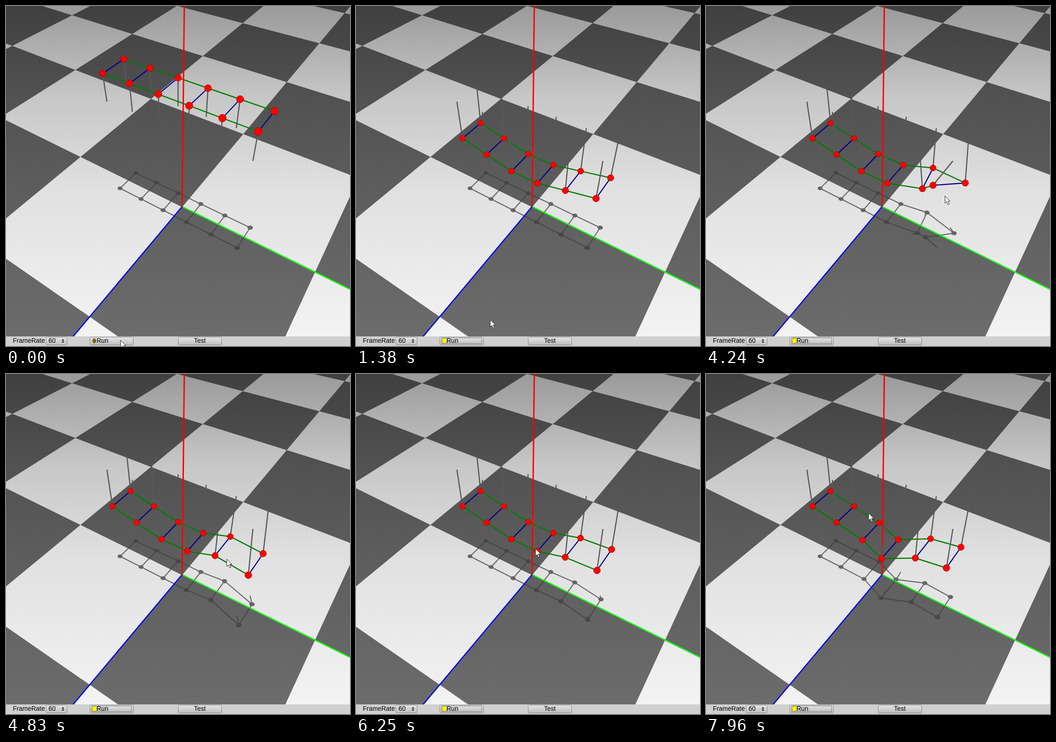
Recreate the animation shown at these times as an HTML page with a canvas. Size 752 px wide and 744 px high, loop 8 s.

```html
<!DOCTYPE html>
<html lang="en">
<head>
<meta charset="utf-8">
<title>Hanging lattice</title>
<style>
  html, body { margin: 0; overflow: hidden; }
  canvas { display: block; }
</style>
</head>
<body>
<canvas id="stage" width="752" height="744"></canvas>
<script>
const W = 752, H = 744, LOOP = 8000, START = 510, ANCHOR = 0.8, COLS = 6;
const stage = document.getElementById('stage').getContext('2d');
const layer = () => Object.assign(document.createElement('canvas'), { width: W, height: H }).getContext('2d');
const floor = layer(), shade = layer();

// Perspective camera: x and z lie on the floor (one tile = 1), h is height.
function project([x, z, h = 0]) {
  const w = 1 - 0.1328 * x - 0.2022 * z - 0.2415 * h;
  return [(385 + 200.5 * x - 238.5 * z - 90.9 * h) / w,
          (440 + 65.8 * x + 103 * z - 298.7 * h) / w, 1 / w];
}

function line(c, a, b, color, width) {
  const p = project(a), q = project(b);
  c.strokeStyle = color;
  c.lineWidth = width;
  c.beginPath();
  c.moveTo(p[0], p[1]);
  c.lineTo(q[0], q[1]);
  c.stroke();
}

function smooth(u) {
  const v = Math.min(1, Math.max(0, u));
  return v * v * (3 - 2 * v);
}

// Each push knocks single balls for a moment, then leaves a pair of balls
// and its inner neighbours displaced, sinking back slowly.
const pushes = [
  { at: 4240, column: 5, decay: 1700, pair: [.06, .085], neighbour: [-.018, -.027],
    knock: { front5: [-.105, -.034], back5: [.043, .029], front4: [.03, -.034], back4: [0, -.033] } },
  { at: 6400, column: 3, decay: 4500, pair: [.01, .113], neighbour: [.014, .004], knock: {} }
];

function swing(row, column, t) {
  const offset = [0, 0];
  for (const p of pushes) {
    const s = t - p.at;
    const bell = Math.exp(-((s / 170) ** 2));
    const drift = smooth(s / 220) * Math.exp(-s / p.decay);
    const rest = column === p.column ? p.pair : column === p.column - 1 ? p.neighbour : [0, 0];
    const hit = p.knock[row + column] || [0, 0];
    for (const n of [0, 1]) offset[n] += bell * hit[n] + drift * rest[n];
  }
  return offset;
}

// Balls hang on inextensible ropes; before that they fall freely.
function makeRow(name, z, t) {
  const seconds = Math.max(0, t - START) / 1000;
  const falling = 1 - 1.65 * seconds ** 2;
  return Array.from({ length: COLS }, (_, i) => {
    const x = -0.5 + 0.2 * i, rope = 0.3 + 0.05 * Math.min(i, COLS - 1 - i, 2);
    const [dx, dz] = swing(name, i, t);
    const hang = ANCHOR - Math.sqrt(rope * rope - dx * dx - dz * dz);
    return { anchor: [x, z, ANCHOR], pos: [x + dx, z + dz, Math.max(hang, falling)] };
  });
}

const ground = p => [p[0], p[1], 0];
const chain = (c, row, color, width, map = p => p) =>
  row.slice(1).forEach((b, i) => line(c, map(row[i].pos), map(b.pos), color, width));
const ropes = row => row.forEach(b => line(stage, b.anchor, b.pos, '#585858', 2.5));

function balls(row) {
  for (const { pos } of row) {
    const [x, y, s] = project(pos);
    stage.beginPath();
    stage.arc(x, y, 5.8 * s, 0, 7);
    stage.fillStyle = '#f00';
    stage.fill();
    stage.strokeStyle = '#b00000';
    stage.lineWidth = 1;
    stage.stroke();
  }
}

function shadows(back, front) {
  const color = '#404040';
  shade.clearRect(0, 0, W, H);
  shade.fillStyle = color;
  for (const row of [back, front]) {
    chain(shade, row, color, 2.2, ground);
    for (const { anchor, pos } of row) {
      const [x, y, s] = project(ground(pos));
      line(shade, ground(anchor), ground(pos), color, 2.2);
      shade.beginPath();
      shade.ellipse(x, y, 5.6 * s, 4.2 * s, 0.1, 0, 7);
      shade.fill();
    }
  }
  back.forEach((b, i) => line(shade, ground(b.pos), ground(front[i].pos), color, 2.2));
  stage.globalAlpha = 0.77;
  stage.drawImage(shade.canvas, 0, 0);
  stage.globalAlpha = 1;
}

function gradient(c, y0, y1, ...stops) {
  const g = c.createLinearGradient(0, y0, 0, y1);
  stops.forEach(([at, level]) => g.addColorStop(at, `rgb(${level},${level},${level})`));
  return g;
}

function paintFloor() {
  floor.fillStyle = gradient(floor, 0, 722, [0, 154], [.27, 198], [.55, 224], [1, 243]);
  floor.fillRect(0, 0, W, H);
  floor.fillStyle = gradient(floor, 0, 722, [0, 64], [.27, 81], [.55, 93], [1, 108]);
  for (let i = -6; i <= 2; i++) for (let j = -7; j <= 1; j++) {
    if ((i + j) % 2) continue;
    floor.beginPath();
    [[i, j], [i + 1, j], [i + 1, j + 1], [i, j + 1]].forEach(p => floor.lineTo(...project(p).slice(0, 2)));
    floor.fill();
  }
}

function button(x, w) {
  stage.fillStyle = gradient(stage, 724, 742, [0, 230], [1, 188]);
  stage.strokeStyle = '#858585';
  stage.lineWidth = 1;
  stage.beginPath();
  stage.roundRect(x + .5, 724.5, w, 17, 2);
  stage.fill();
  stage.stroke();
}

function toolbar(running) {
  stage.fillStyle = '#d0d0d0';
  stage.fillRect(0, 723, W, 21);
  button(87, 46);
  button(183, 95);
  button(376, 95);
  stage.fillStyle = running ? '#ff0' : '#806400';
  stage.strokeStyle = running ? '#b8b000' : '#6a5200';
  stage.beginPath();
  if (running) stage.roundRect(188.5, 727.5, 9, 10, 2);
  else stage.ellipse(193, 732.5, 3.5, 5, 0, 0, 7);
  stage.fill();
  stage.stroke();
  if (running) {
    stage.strokeStyle = '#333';
    stage.setLineDash([1, 1]);
    stage.strokeRect(187.5, 726.5, 87, 12);
    stage.setLineDash([]);
  }
  stage.fillStyle = '#000';
  stage.font = '14px "Liberation Sans", Arial, sans-serif';
  stage.fillText('FrameRate', 15, 737);
  stage.fillText('60', 93, 737);
  stage.fillText('Run', 198, 737);
  stage.fillText('Test', 411, 737);
  for (const d of [-1, 1]) {
    stage.beginPath();
    stage.moveTo(121.5, 733 + d);
    stage.lineTo(127.5, 733 + d);
    stage.lineTo(124.5, 733 + 4 * d);
    stage.fill();
  }
}

// The pointer glides from stop to stop: departure, arrival, place.
const start = [250, 731];
const glides = [
  [1000, 1380, 293, 686], [1380, 2200, 497, 391], [2200, 2610, 522, 415],
  [4500, 5400, 392, 381], [6200, 6700, 386, 406], [7020, 7760, 355, 304]
];

function pointerAt(t) {
  let [x, y] = start;
  for (const [from, to, nx, ny] of glides) {
    const u = smooth((t - from) / (to - from));
    x += (nx - x) * u;
    y += (ny - y) * u;
  }
  return [x, y];
}

function cursor([x, y]) {
  stage.beginPath();
  [[0, 0], [0, 16], [3.6, 12.6], [6.4, 19], [9, 18], [6.3, 11.7], [11.3, 11.7]]
    .forEach(([dx, dy]) => stage.lineTo(x + .5 + dx, y + .5 + dy));
  stage.closePath();
  stage.fillStyle = '#fff';
  stage.fill();
  stage.strokeStyle = '#222';
  stage.lineWidth = 1;
  stage.stroke();
}

function draw(t) {
  const back = makeRow('back', -0.1, t), front = makeRow('front', 0.1, t);
  const lift = 0.006, origin = [0, 0, lift];
  stage.drawImage(floor.canvas, 0, 0);
  shadows(back, front);
  line(stage, origin, [2, 0, lift], '#0f0', 2.6);
  line(stage, origin, [0, 1.6, lift], '#00f', 2.6);
  ropes(back);
  chain(stage, back, '#007d00', 2.5);
  line(stage, origin, [0, 0, 1.6], '#f00', 3);
  ropes(front);
  front.forEach((b, i) => line(stage, b.pos, back[i].pos, '#00008b', 2.3));
  chain(stage, front, '#007d00', 2.5);
  balls(back);
  balls(front);
  toolbar(t >= START);
  cursor(pointerAt(t));
}

function tick() {
  draw(performance.now() % LOOP);
  requestAnimationFrame(tick);
}

paintFloor();
tick();
</script>
</body>
</html>
```
